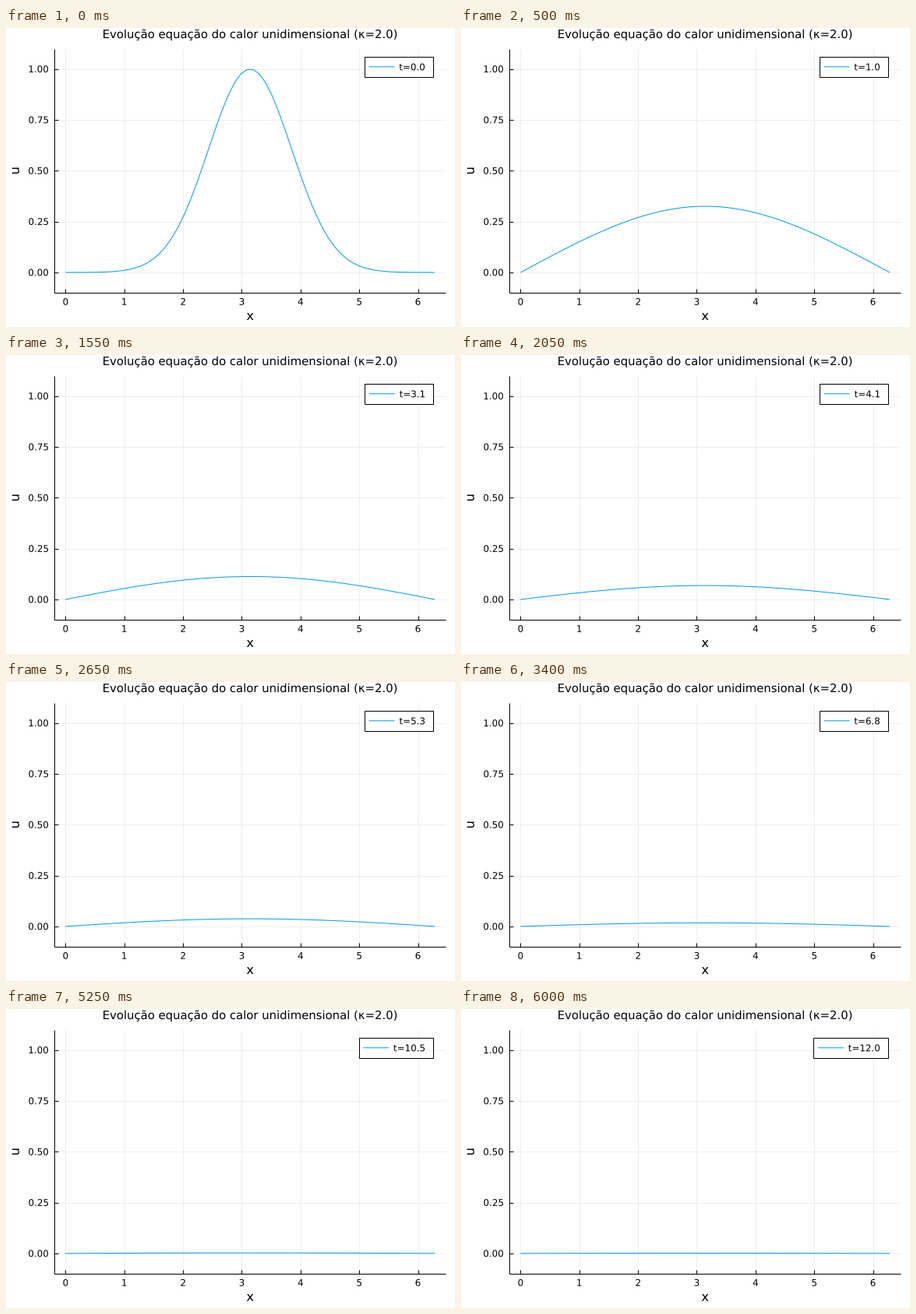
Recreate the animation shown at these times as a matplotlib script. Size 576x384 px, loop 6.05 s.

```python
import numpy as np
import matplotlib.pyplot as plt
from matplotlib.animation import FuncAnimation
from matplotlib.patches import PathPatch, Rectangle
from matplotlib.textpath import TextPath
from matplotlib.transforms import Affine2D

plt.rcParams["font.family"] = "DejaVu Sans"

W, H, DPI = 576, 384, 96
FRAMES, INTERVAL, DT = 121, 50, 0.1
KAPPA = 2.0
PX = 72 / DPI                      # one pixel in points
BLUE = "#009AF9"
TITLE, GUIDE, TICK = 14.85, 16.3, 11.88

LEFT, RIGHT, TOP, BOTTOM = 62.2, 564.1, 26.5, 340.0
X0, X_UNIT = 76.4, 75.35
Y0, Y_UNIT = 313.9, 261.25
BOX_RIGHT, BOX_TOP, BOX_BOTTOM = 547.5, 37, 63

fig = plt.figure(figsize=(W / DPI, H / DPI), dpi=DPI, facecolor="white")
ax = fig.add_axes([0, 0, 1, 1])
ax.set_xlim(0, W)
ax.set_ylim(H, 0)
ax.axis("off")


def sx(x):
    return X0 + X_UNIT * x


def sy(u):
    return Y0 - Y_UNIT * u


def text_path(s, size, x, baseline, align=0.5, angle=0):
    """Outline of s; align 0, 0.5 or 1 puts its left, centre or right at x."""
    path = TextPath((0, 0), s, size=size)
    box = path.get_extents()
    shift = -(box.x0 + align * box.width)
    move = Affine2D().translate(shift, 0).scale(1, -1)
    return move.rotate_deg(angle).translate(x, baseline).transform_path(path)


def add_text(*args, **kw):
    patch = PathPatch(text_path(*args, **kw), fc="black", lw=0, zorder=6)
    return ax.add_patch(patch)


def segment(xs, ys, color="black", width=1.0, **kw):
    return ax.plot(xs, ys, color=color, lw=width * PX,
                   solid_capstyle="butt", **kw)[0]


# Grid, ticks and tick labels
for k in range(7):
    x = sx(k)
    segment([x, x], [TOP, BOTTOM], alpha=0.065, zorder=1)
    segment([x, x], [BOTTOM, BOTTOM - 5], zorder=2)
    add_text(str(k), TICK, x, 355.7)
for v in np.linspace(0, 1, 5):
    y = sy(v)
    segment([LEFT, RIGHT], [y, y], alpha=0.065, zorder=1)
    segment([LEFT, LEFT + 5], [y, y], zorder=2)
    add_text(f"{v:.2f}", TICK, 54, y + 4.3, align=1)
segment([LEFT, LEFT], [TOP, BOTTOM], zorder=2)
segment([LEFT, RIGHT], [BOTTOM, BOTTOM], zorder=2)

# Title and axis names
mid = (LEFT + RIGHT) / 2
add_text(f"Evolução equação do calor unidimensional (κ={KAPPA})", TITLE, mid, 13)
add_text("x", GUIDE, mid, 375)
add_text("u", GUIDE, 16.8, (TOP + BOTTOM) / 2, angle=-90)

# Animated parts
curve = segment([], [], BLUE, zorder=3, solid_joinstyle="round")
box = ax.add_patch(Rectangle((0, BOX_TOP), 1, BOX_BOTTOM - BOX_TOP,
                             fc="white", ec="black", lw=PX, zorder=4))
sample = segment([], [], BLUE, zorder=5, snap=False)
label = add_text("t=0.0", TICK, 0, 0)

# Sine series of a centred Gaussian with fixed ends
xs = np.linspace(0, 2 * np.pi, 60)
n = np.arange(1, 24, 2)
coef = np.sin(n * np.pi / 2) * np.exp(-n**2 / 16) / np.sqrt(np.pi)
modes = np.sin(np.outer(xs, n) / 2)


def heat(t):
    return modes @ (coef * np.exp(-KAPPA * n**2 / 4 * t))


def update(i):
    t = i * DT
    curve.set_data(sx(xs), sy(heat(t)))
    path = text_path(f"t={t:.1f}", TICK, BOX_RIGHT - 10.5, 54.3, align=1)
    label.set_path(path)
    start = path.get_extents().x0
    box.set_x(start - 44.7)
    box.set_width(BOX_RIGHT - start + 44.7)
    sample.set_data([start - 39.2, start - 6.2], [49.8, 49.8])
    return curve, box, sample, label


anim = FuncAnimation(fig, update, frames=FRAMES, interval=INTERVAL,
                     repeat=True, repeat_delay=0, blit=False)
plt.show()
```
